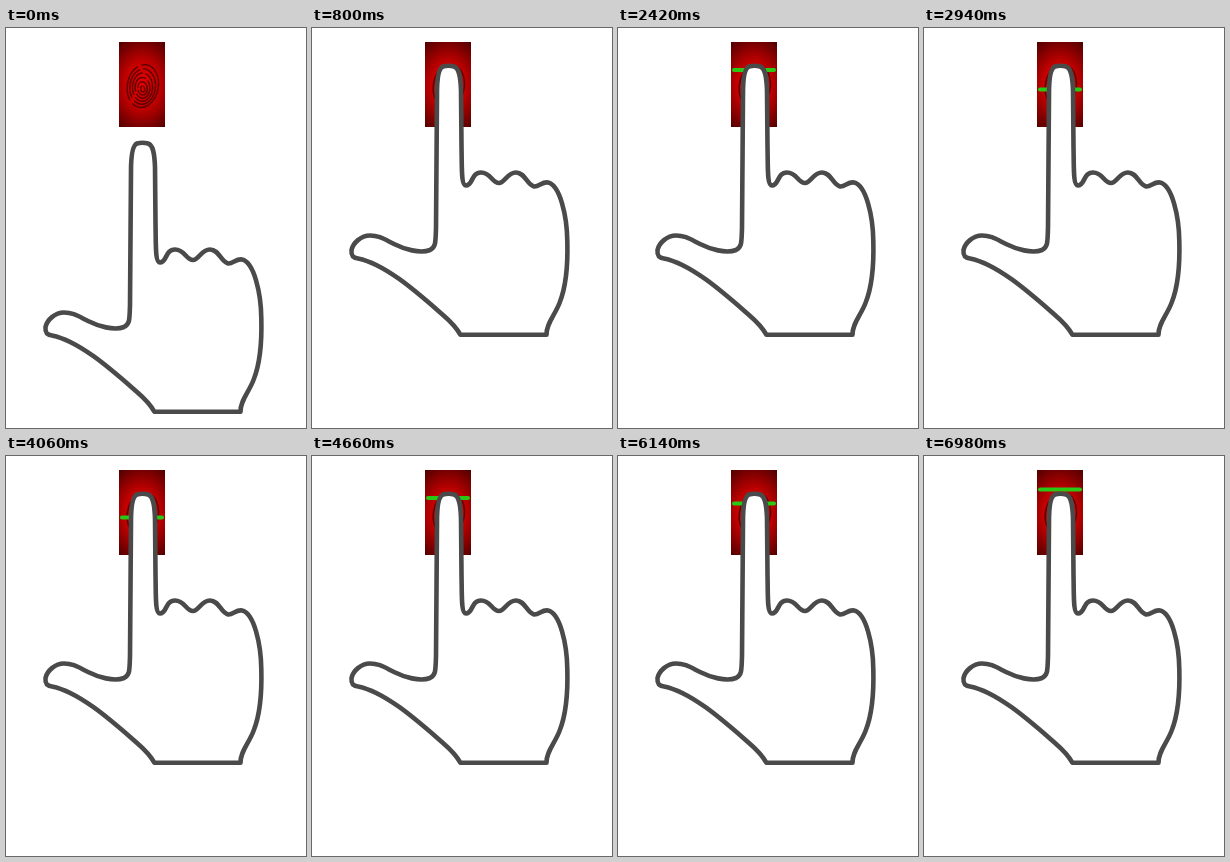
Animation, 300 px wide and 400 px high, one loop 7180 ms. Source, as an HTML page:

```html
<!DOCTYPE html>
<html lang="en">
<head>
<meta charset="utf-8">
<title>Fingerprint scan</title>
<style>
  html, body { margin: 0; width: 100%; height: 100%; overflow: hidden; background: #fff; }
  svg { display: block; }
</style>
</head>
<body>
<svg width="300" height="400" viewBox="0 0 300 400">
  <defs>
    <radialGradient id="glow" gradientUnits="userSpaceOnUse" cx="0" cy="0" r="1"
                    gradientTransform="translate(136 57) scale(42 56)">
      <stop offset="0" stop-color="#e80000"/>
      <stop offset=".4" stop-color="#c40000"/>
      <stop offset="1" stop-color="#420000"/>
    </radialGradient>
  </defs>
  <rect x="113" y="14" width="46" height="85" fill="url(#glow)"/>
  <g id="print" fill="none" stroke="#600000" stroke-width="1.5"></g>
  <path id="beam" d="M116 0H156" stroke="#28c814" stroke-width="4" stroke-linecap="round"/>
  <path id="hand" fill="#fff" stroke="#4a4a4a" stroke-width="4.6" stroke-linejoin="round"
    d="M131 38.5 C127 40 125 50 125 66 L124 200 C123.500 214 124 219 118 222
       C108 226 92 221 82 216 C72 211 67 207.500 58 207.500
       C49 207.500 41 215 39.500 222 C39 228 41 230 46 230.500
       C74 236 108 267 131 287 C138 293 144 299 148.500 306.800 H234.500
       C234 296 243 287 247.500 275 C254 259 256 238 255.300 213
       C255 188 248 157 236 154.500 C230 153.500 227 159 222 158.500
       C215 157 213 144.500 204 144.500 C195 144.500 193 155 187 155
       C180 155 179 144.500 169 144.500 C159 144.500 161 157.500 154 157.500
       C149 157.500 150 140 149.500 118 L149 62 C148.500 48 147 40 142 38.500 Q136.500 37 131 38.500Z"/>
</svg>
<script>
const LOOP = 7180, STEP = 80, SWEEP = 1120;
const TOP = 33.5, BOTTOM = 75.5;
const [print, beam, hand] = ['print', 'beam', 'hand'].map(id => document.getElementById(id));

// Broken, slightly tilted ridges around a common centre
for (let i = 0; i < 6; i++) {
  const ridge = document.createElementNS('http://www.w3.org/2000/svg', 'ellipse');
  const attrs = {
    cx: 136.5, cy: 61 - i * 0.6, rx: 2 + i * 2.7, ry: 3 + i * 3.7,
    transform: `rotate(${i * 4 - 10} 136.5 60)`,
    'stroke-dasharray': `${12 + i * 5} ${1 + i * 0.6}`
  };
  for (const name in attrs) ridge.setAttribute(name, attrs[name]);
  print.append(ridge);
}

const stepsSince = (time, start, count) =>
  Math.max(0, Math.min(count, Math.floor((time - start) / STEP) + 1)) / count;

function beamY(t) {
  if (t < 1500) return 18.5;
  if (t < 1580) return TOP;
  const u = (t - 1580) % SWEEP;
  const progress = stepsSince(u, 0, 6) - stepsSince(u, 600, 5);
  return TOP + (BOTTOM - TOP) * progress;
}

function draw() {
  const t = performance.now() % LOOP;
  const handY = t < 400 ? 77 : t < 800 ? 42 : 0;
  hand.setAttribute('transform', `translate(0 ${handY})`);
  beam.setAttribute('visibility', t < 1200 ? 'hidden' : 'visible');
  beam.setAttribute('transform', `translate(0 ${beamY(t)})`);
  requestAnimationFrame(draw);
}
draw();
</script>
</body>
</html>
```
